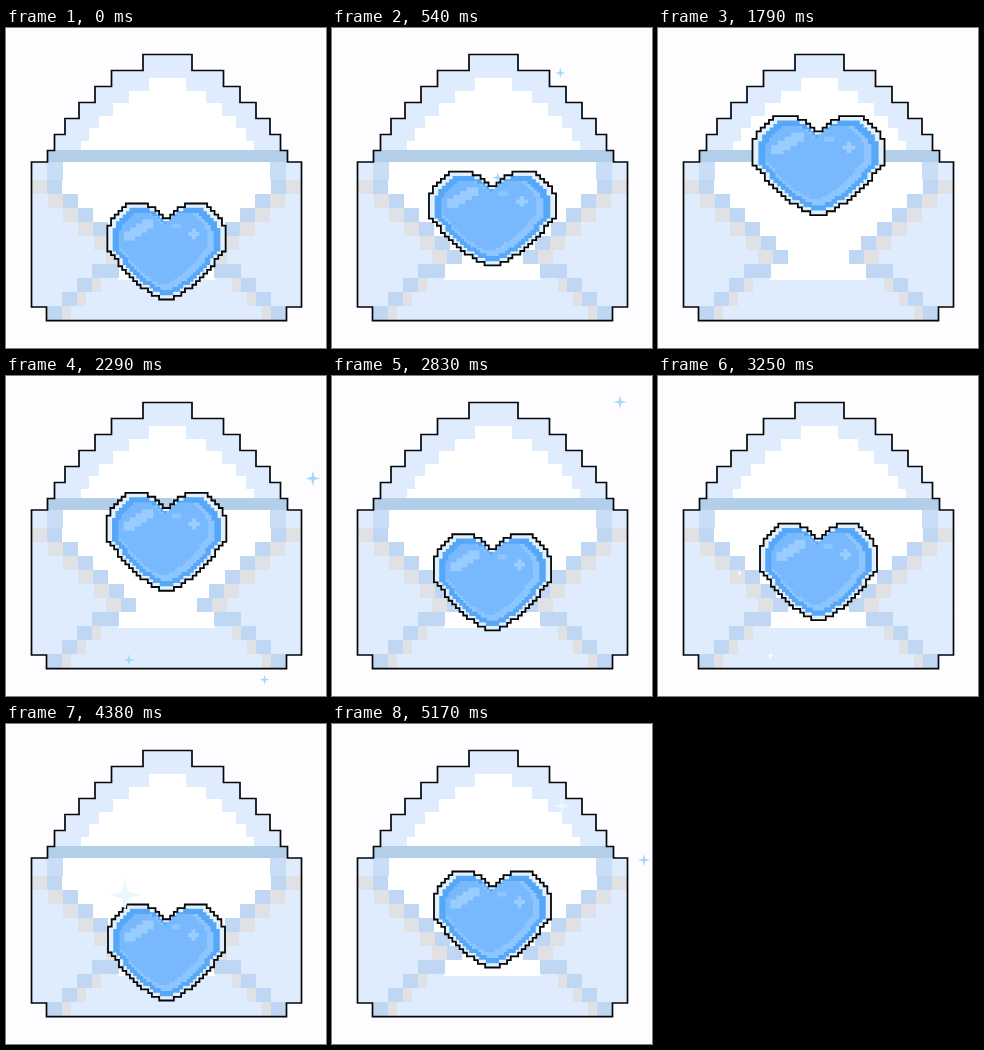
An HTML page with a canvas for the animation above (5210 ms loop, 320 by 320 pixels).

```html
<!DOCTYPE html>
<html lang="en">
<head>
<meta charset="utf-8">
<title>Love letter</title>
<style>
html, body { margin: 0; width: 100%; height: 100%; overflow: hidden; background: #fdfcff; }
canvas { display: block; width: 320px; height: 320px; }
</style>
</head>
<body>
<canvas id="stage" width="320" height="320"></canvas>
<script>
const ctx = document.getElementById('stage').getContext('2d');
const LOOP = 5210, STEP = LOOP / 125, MID = 160.5;
const INK = '#050709', PANEL = '#deecfe', FOLD = '#bfd7f2', SHADE = '#e0e1e5';
const BLUE = '#a3d8f8', PALE = '#e8f8fd', WHITE = '#fff';

// Heart: time, centre y, height
const bounce = [
  [0, 223.5, 96], [1080, 149, 91], [1790, 137.5, 99], [2830, 206.5, 96],
  [3710, 179.5, 97], [4380, 228.5, 96], [5170, 195.5, 96]
];

// Main sparkles: time of full size, x, y, radius; smaller ones are scattered
const sparks = [
  [1080, 126, 20, 14], [1080, 8, 270, 6], [2830, 288, 26, 7], [3710, 236, 12, 7],
  [3710, 88, 6, 6], [4380, 119, 171, 16], [5170, 312, 136, 6], [5170, 230, 82, 9]
].map(s => [...s, s[3] > 8 ? PALE : BLUE]);
let seed = 11;
const rand = () => (seed = seed * 16807 % 2147483647) / 2147483647;
for (let time = 540; time < 5000; time += 860)
  for (let i = 0; i < 3; i++)
    sparks.push([time + rand() * 120 - 60, rand() * 320, rand() * 320,
      4 + rand() * 4, rand() < .6 ? BLUE : WHITE]);

function rect(color, x, y, w, h) {
  ctx.fillStyle = color;
  ctx.fillRect(x, y, w, h);
}

function polygon(points) {
  ctx.beginPath();
  points.forEach(([x, y]) => ctx.lineTo(x, y));
  ctx.closePath();
}

function fill(color) {
  ctx.fillStyle = color;
  ctx.fill();
}

function stroke(width) {
  ctx.strokeStyle = INK;
  ctx.lineWidth = width;
  ctx.stroke();
}

function mirrored(draw) {
  draw();
  ctx.save();
  ctx.translate(2 * MID, 0);
  ctx.scale(-1, 1);
  draw();
  ctx.restore();
}

function outlinePoints() {
  const left = [], right = [];
  const step = (mid, half, top, bottom) => {
    left.push([mid - half, top], [mid - half, bottom]);
    right.push([mid + half, top], [mid + half, bottom]);
  };
  [24.5, 56, 72.5, 88.5, 102.5, 113, 120].forEach((half, i) =>
    step(MID + 1, half, 26.5 + 16 * i, i < 6 ? 42.5 + 16 * i : 134));
  step(MID, 135, 134, 279);
  step(MID, 120, 279, 292.6);
  return right.concat(left.reverse());
}
const outline = outlinePoints();

function folds() {
  rect('#c9def6', 41, 134, 16, 18);
  rect(WHITE, 57, 134, MID - 56.5, 18);
  for (let i = 1; i < 7; i++) {
    const x = Math.min(Math.round(26 + 15.3 * i), 115), y = 138 + 14 * i;
    rect(SHADE, x - 15, y, 15, 14);
    rect(FOLD, x, y, 15, 14);
    rect(WHITE, x + 15, y, MID - x - 14.5, 14);
  }
  rect(WHITE, 112, 236, MID - 111.5, 16);
  for (let i = 0; i < 4; i++) {
    const x = 86 - 15 * i, y = 236 + 14 * i;
    rect(SHADE, x + 15, y, 9, 14);
    rect(FOLD, x, y, i ? 15 : 27, 14);
  }
}

function envelope() {
  polygon(outline);
  fill(PANEL);
  for (let i = 0; i < 6; i++) {
    const half = Math.round(18 + 21 * i - 1.5 * i * i), y = Math.round(50 + 12.6 * i);
    rect(WHITE, 161.5 - half - .5, y, 2 * half + 1, 122 - y);
  }
  mirrored(folds);
  rect('#b2cee9', 41, 122, 240, 12);
  polygon(outline);
  stroke(1.7);
}

// Stepped outline of a heart in a box of 117 by 96 around 0, 0
function heartPoints() {
  const cols = 16, rows = 26, half = [];
  const snap = v => Math.round(v * rows) / rows * 96 - 48;
  const top = u => snap((u < .5 ? .18 : .28) * Math.abs(2 * u - 1) ** 2.5);
  const bottom = u => snap(1 - .54 * u ** 1.6);
  const add = (i, edge, u) => half.push([i / cols * 58.5, edge(u)]);
  for (let i = 0; i < cols; i++) {
    const u = (i + .5) / cols;
    add(i, top, u);
    add(i + 1, top, u);
  }
  for (let i = cols - 1; i >= 0; i--) {
    const u = (i + .5) / cols;
    add(i + 1, bottom, u);
    add(i, bottom, u);
  }
  return half.concat(half.map(([x, y]) => [-x, y]).reverse());
}
const heartShape = heartPoints();

function heart(y, h, w) {
  const sx = w / 117, sy = h / 96;
  const trace = (k, shift = 0) => polygon(heartShape.map(
    ([px, py]) => [(px * k + shift) * sx, (py * k + shift) * sy]));
  ctx.save();
  ctx.translate(MID, y);
  trace(1);
  fill('#e2f0fd');
  trace(.91);
  fill('#56a7f8');
  trace(.8);
  fill('#8cc5ff');
  trace(.74, -3);
  fill('#78b8fd');
  ctx.save();
  ctx.scale(sx, sy);
  for (let i = 0; i < 4; i++) rect('#9acdff', -42 + 6 * i, -20 - 4 * i, 11, 9);
  rect('#8cc5ff', 5, -28, 9, 5);
  rect('#9bceff', 25, -23, 4, 11);
  rect('#9bceff', 21.5, -19.5, 11, 4);
  ctx.restore();
  trace(1);
  stroke(1.8);
  ctx.restore();
}

function spark(t, [peak, x, y, r, color]) {
  if (Math.abs(t - peak) >= 220) return;
  const size = r * Math.cos((t - peak) / 220 * Math.PI / 2);
  const star = [];
  for (let i = 0; i < 8; i++) {
    const d = i % 2 ? size * .28 : size, a = i * Math.PI / 4;
    star.push([x + d * Math.cos(a), y + d * Math.sin(a)]);
  }
  polygon(star);
  fill(color);
}

function poseAt(t) {
  const i = Math.max(1, bounce.findIndex(p => p[0] > t));
  const last = t >= bounce.at(-1)[0];
  const [from, to] = last ? [bounce.at(-1), bounce.at(-1)] : [bounce[i - 1], bounce[i]];
  const k = last ? 1 : (1 - Math.cos(Math.PI * (t - from[0]) / (to[0] - from[0]))) / 2;
  const mix = j => from[j] + (to[j] - from[j]) * k;
  const swell = Math.exp(-(((t - 1200) / 680) ** 2));
  return [mix(1), mix(2), 117 + 29 * swell];
}

function draw(now) {
  const t = Math.floor(now % LOOP / STEP) * STEP;
  rect('#fdfcff', 0, 0, 320, 320);
  envelope();
  heart(...poseAt(t));
  sparks.forEach(s => spark(t, s));
}

const start = performance.now();
function tick() {
  draw(performance.now() - start);
  requestAnimationFrame(tick);
}
tick();
</script>
</body>
</html>
```
